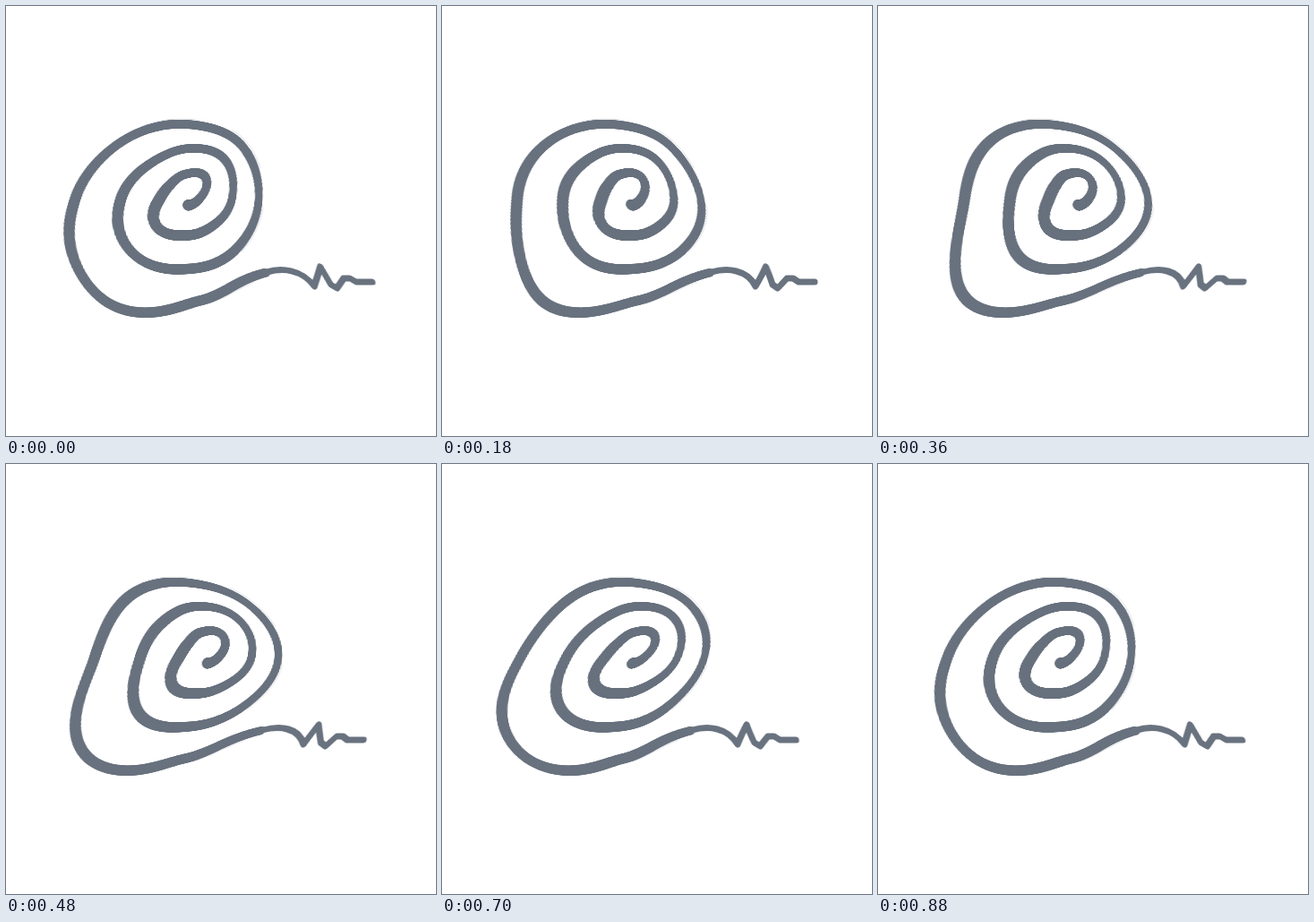
Recreate the animation shown at these times as an HTML page with a canvas. Size 480 by 480 pixels, loop 0.91 s.

```html
<!DOCTYPE html>
<html>
<head>
<meta charset="utf-8">
<style>
html, body { margin: 0; height: 100%; overflow: hidden; background: #fff; }
canvas { display: block; }
</style>
</head>
<body>
<canvas id="stage" width="480" height="480"></canvas>
<script>
const SIZE = 480, LOOP = 910, POSES = 30;
const INK = '#69727f';
const CENTER = { x: 208, y: 216 };

// Spiral radius at every eighth of a turn, starting at the lower right
const radii = [
  9, 18, 34, 28, 22, 26, 43, 40,
  43, 55, 61, 57, 57, 69, 87, 77,
  77, 85, 83, 83, 99, 120, 155, 113,
  115, 220
];
const tail = 'M290 297 C308 292 330 294 339 313 L351 291 L358 311 L364 315' +
  ' L374 304 L381 304 L387 308 L405 308';

function radiusAt(k) {
  const i = Math.floor(k), u = k - i;
  const [a, b, c, d] = [Math.max(i - 1, 0), i, i + 1, i + 2].map(n => radii[n]);
  return b + u / 2 * (c - a + u * (2 * a - 5 * b + 4 * c - d + u * (3 * (b - c) + d - a)));
}

function spiral(k, offset = 0) {
  const angle = (1 - k) * Math.PI / 4, r = radiusAt(k) + offset;
  return [CENTER.x + r * Math.cos(angle), CENTER.y + r * Math.sin(angle)];
}

// Heavy where the brush lands and on the left of each turn, light on the right
function brushWidth(k) {
  return 10 + 2 * Math.cos((k - 5.5) * Math.PI / 4) + 3 / (1 + k);
}

function paint(ctx) {
  const end = radii.length - 2;
  ctx.lineCap = ctx.lineJoin = 'round';
  ctx.strokeStyle = ctx.fillStyle = INK;
  for (let k = 0; k < end; k += 0.01) {
    ctx.beginPath();
    ctx.arc(...spiral(k), brushWidth(k) / 2, 0, 2 * Math.PI);
    ctx.fill();
  }
  ctx.lineWidth = 7;
  ctx.stroke(new Path2D(tail));

  // Stray bristles beside the outer turn
  ctx.beginPath();
  for (let k = 16; k < end; k += 0.05) ctx.lineTo(...spiral(k, 6));
  ctx.globalAlpha = 0.25;
  ctx.lineWidth = 0.8;
  ctx.setLineDash([60, 45]);
  ctx.stroke();
}

// Sideways wave travelling up through the drawing
function sway(y, pose) {
  return 11 * Math.sin(2 * Math.PI * pose / POSES + (y - 291) * 0.0218);
}

const drawing = document.createElement('canvas');
drawing.width = drawing.height = SIZE;
paint(drawing.getContext('2d'));

const stage = document.getElementById('stage').getContext('2d');
const start = performance.now();

function render() {
  const t = (performance.now() - start) % LOOP;
  const pose = Math.floor((t < 510 ? t : t - 10) / 30);
  stage.clearRect(0, 0, SIZE, SIZE);
  for (let y = 0; y < SIZE; y++) {
    stage.drawImage(drawing, 0, y, SIZE, 1, sway(y, pose), y, SIZE, 1);
  }
  requestAnimationFrame(render);
}
render();
</script>
</body>
</html>
```
